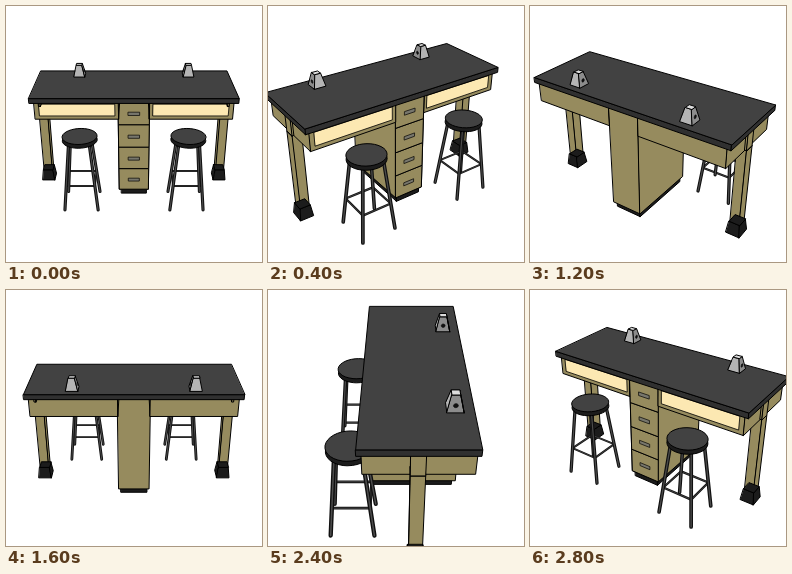
Animation of 256 by 256 pixels, one loop 3200 ms. Source, as an HTML page:

```html
<!DOCTYPE html>
<html lang="en">
<head>
<meta charset="utf-8">
<title>Rotating workbench</title>
<style>
  html, body { margin: 0; width: 100%; height: 100%; overflow: hidden; background: #fff; }
  svg { display: block; width: 100%; height: 100%; }
  .view { visibility: hidden; animation: turn 3200ms step-end infinite; }
  @keyframes turn {
    0% { visibility: visible; }
    12.5%, 100% { visibility: hidden; }
  }
</style>
</head>
<body>
<svg id="stage" viewBox="0 0 256 256" stroke-linejoin="round" stroke-linecap="round"></svg>
<script>
// Units: half the bench length is 1. x runs along the bench, y to its back, z up.
const VIEWS = 8, STEP = 400;
const FOCAL = 530, ORBIT = { x: 3.41, y: 4.87, z: 2.5 };
const FLOOR = -.6, TOP = .5, UNDER = .45, APRON = .27;
const MID = .137, DEPTH = .375, FRONT = -.21, BACK = .495;
const WOOD = '#968b5e', CREAM = '#fce8b2', DARK = '#424242', EDGE = '#303030', BLACK = '#1c1c1c';

// The camera circles on an ellipse of constant height and looks at the centre.
function camera(angle) {
  const cx = -ORBIT.x * Math.sin(angle), cy = -ORBIT.y * Math.cos(angle);
  const ground = Math.hypot(cx, cy), range = Math.hypot(ground, ORBIT.z);
  const dx = -cx / ground, dy = -cy / ground;
  const sin = ORBIT.z / range, cos = ground / range;
  const along = (x, y) => x * dx + y * dy;
  const scale = ([x, y, z]) => FOCAL / (range + along(x, y) * cos - z * sin);
  const project = p => {
    const [x, y, z] = p, k = scale(p);
    return [128 + (x * dy - y * dx) * k, 128 - (along(x, y) * sin + z * cos) * k];
  };
  return { along, scale, project };
}

function drawView(angle) {
  const { along, scale, project } = camera(angle);
  const path = points => points.map(p => project(p).map(n => n.toFixed(2))).join(' ');

  // Corners run counterclockwise seen from outside; faces turned away are dropped.
  function face(fill, points, width = 1) {
    const flat = points.map(project);
    const area = flat.reduce((sum, [x, y], i) => {
      const [nx, ny] = flat[(i + 1) % flat.length];
      return sum + x * ny - nx * y;
    }, 0);
    return area < 0
      ? `<polygon points="${path(points)}" fill="${fill}" stroke="#000" stroke-width="${width}"/>` : '';
  }

  const rect = (x, y, hx, hy, z) =>
    [[x - hx, y - hy, z], [x + hx, y - hy, z], [x + hx, y + hy, z], [x - hx, y + hy, z]];

  function box(x, y, hx, hy, z0, z1, fill, { flare = 0, lid = fill, ends = fill } = {}) {
    const low = rect(x, y, hx + flare, hy + flare, z0), high = rect(x, y, hx, hy, z1);
    const sides = low.map((p, i) => {
      const j = (i + 1) % 4;
      return face(i % 2 ? ends : fill, [p, low[j], high[j], high[i]]);
    });
    return sides.join('') + face(lid, high);
  }

  const panel = (fill, x0, x1, z0, z1, width) =>
    face(fill, [[x0, FRONT, z0], [x1, FRONT, z0], [x1, FRONT, z1], [x0, FRONT, z1]], width);

  const ring = (x, y, z, radius, count, turn = 0) =>
    Array.from({ length: count }, (_, i) => {
      const a = turn + i * 2 * Math.PI / count;
      return [x + radius * Math.cos(a), y + radius * Math.sin(a), z];
    });

  function tube(points, size) {
    const width = size * scale(points[0]);
    const stroke = (color, w) =>
      `<polyline points="${path(points)}" fill="none" stroke="${color}" stroke-width="${w.toFixed(2)}"/>`;
    return stroke('#101010', width) + stroke('#4c4c4c', width * .35);
  }

  function stool(x) {
    const y = -.33, seat = .145, brace = .62;
    const corners = (z, radius) => ring(x, y, z, radius, 4, Math.PI / 4);
    const heads = corners(seat - .04, .14), feet = corners(FLOOR, .235);
    const rungs = heads.map((h, i) => h.map((n, k) => n + (feet[i][k] - n) * brace));
    return tube([...rungs, rungs[0]], .02)
      + heads.map((h, i) => tube([h, feet[i]], .03)).join('')
      + face(BLACK, ring(x, y, seat - .04, .168, 32))
      + face(DARK, ring(x, y, seat, .168, 32));
  }

  function cabinet() {
    let art = box(0, MID, .13, .33, FLOOR, -.54, BLACK)
      + box(0, (FRONT + BACK) / 2, .15, (BACK - FRONT) / 2, -.54, UNDER, WOOD);
    for (let z = -.54; z < .4; z += .25) {
      art += panel(WOOD, -.15, .15, z, Math.min(z + .25, UNDER))
        + panel('#77766c', -.055, .055, z + .1, z + .135, .7);
    }
    return art;
  }

  const apron = side =>
    box(side * .555, (FRONT + BACK) / 2, .405, (BACK - FRONT) / 2, APRON, UNDER, WOOD)
    + panel(CREAM, side * .55 - .365, side * .55 + .365, APRON + .035, UNDER - .02, .8);

  const leg = side =>
    box(side * .932, MID, .043, .047, -.5, APRON, WOOD)
    + box(side * .932, MID, .05, .055, FLOOR, -.48, BLACK, { flare: .015 });

  const bracket = side => box(side * .967, MID, .008, .047, APRON, UNDER, WOOD);

  function fitting(x) {
    const y = .385, h = .12;
    const dot = side => {
      const circle = ring(0, 0, 0, .016, 12).map(([u, v]) => [x + side * .046, y + side * u, TOP + .05 + v]);
      return face('#111', circle, .5);
    };
    return box(x, y, .028, .028, TOP, TOP + h, '#b4b4b4', { flare: .028, lid: '#ddd', ends: '#8c8c8c' })
      + dot(1) + dot(-1);
  }

  const parts = [{ x: 0, y: MID, z: -.05, art: cabinet() }];
  for (const side of [-1, 1]) {
    parts.push(
      { x: side * .525, y: -.33, z: 0, art: stool(side * .525) },
      { x: side * .555, y: MID, z: .36, art: apron(side) },
      { x: side * .932, y: MID, z: -.1, art: leg(side) },
      { x: side * .967, y: MID, z: .36, art: bracket(side) });
  }
  const distance = ({ x, y, z }) => along(x, y) - z / 2;
  parts.sort((a, b) => distance(b) - distance(a));

  return parts.map(part => part.art).join('')
    + box(0, MID, 1, DEPTH, UNDER, TOP, EDGE, { lid: DARK })
    + fitting(-.57) + fitting(.57);
}

document.getElementById('stage').innerHTML = Array.from({ length: VIEWS }, (_, i) =>
  `<g class="view" style="animation-delay:${(i - VIEWS) * STEP}ms">${drawView(i * 2 * Math.PI / VIEWS)}</g>`
).join('');
</script>
</body>
</html>
```
